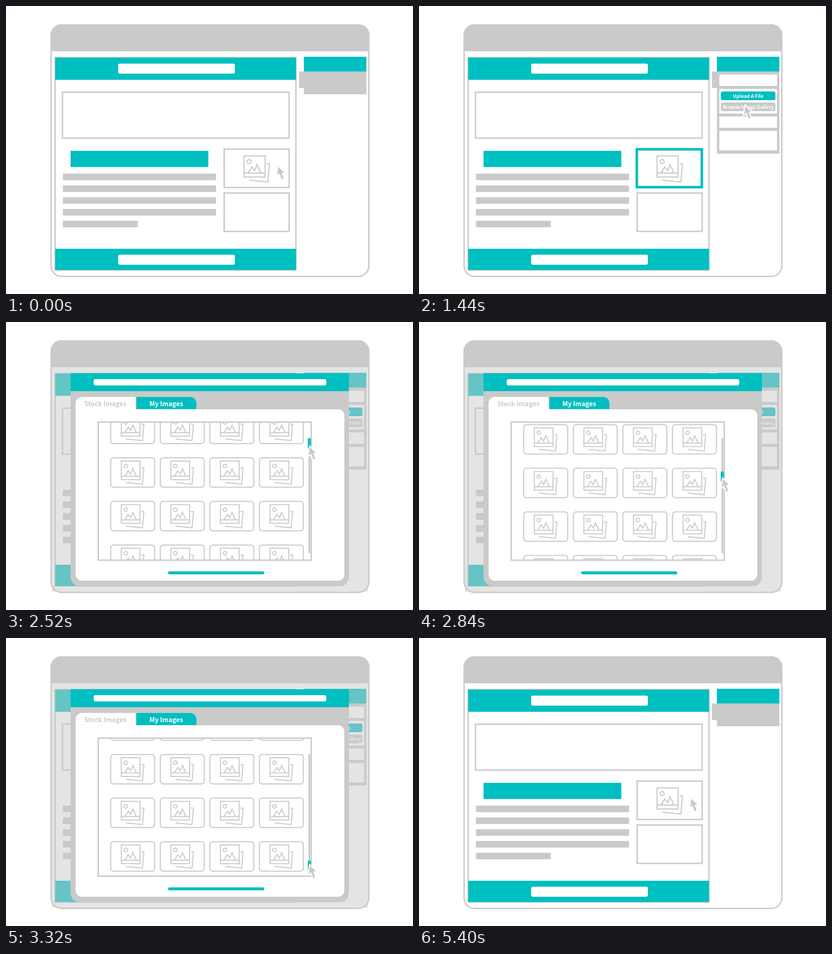
These frames come from a looping animation (889x630 px, 5.76 s). An HTML page:

```html
<!DOCTYPE html>
<html lang="en">
<head>
<meta charset="utf-8">
<title>Image gallery demo</title>
<style>
  html, body { margin: 0; width: 100%; height: 100%; overflow: hidden; background: #fff; }
  svg { display: block; width: 889px; height: 630px; }
  .teal { fill: #00bfc0; }
  .grey { fill: #cacaca; }
  .white { fill: #fff; }
  .line { fill: none; stroke: #cacaca; stroke-width: 3; }
  text { font-family: "Noto Sans CJK JP", "Noto Sans CJK SC", "Open Sans", sans-serif; font-weight: 700; text-anchor: middle; }
  .small { font-size: 10.4px; }
  .large { font-size: 14.2px; }

  .anim { animation: 5760ms cubic-bezier(.37, 0, .63, 1) infinite; }
  .select { animation-name: select; }
  .panel { animation-name: panel; }
  .fields { animation-name: fields; }
  .shade { animation-name: shade; }
  .modal { animation-name: grow; animation-timing-function: cubic-bezier(.5, 1, .89, 1); transform-origin: 779px 112px; }
  .fade { animation-name: fade; }
  .list { animation-name: list; }
  .rows { animation-name: rows; }
  .handle { animation-name: handle; }
  .pick { animation-name: pick; }
  .pick-fade { animation-name: pick-fade; }
  .cursor-x { animation-name: cursor-x; }
  .cursor-y { animation-name: cursor-y; }

  @keyframes select {
    0%, .694% { opacity: 0; }
    5.2%, 41.6% { opacity: 1; }
    41.61%, 100% { opacity: 0; }
  }
  @keyframes panel {
    0%, .3% { height: 50px; }
    10.417%, 83.6% { height: 180px; }
    93.75%, 100% { height: 50px; }
  }
  @keyframes fields {
    0%, .3% { opacity: 0; }
    7%, 86% { opacity: 1; }
    92%, 100% { opacity: 0; }
  }
  @keyframes shade {
    0%, 31.25% { opacity: 0; }
    34.72%, 73.4% { opacity: 1; }
    76.39%, 100% { opacity: 0; }
  }
  @keyframes grow {
    0%, 31.25% { transform: scale(0); }
    40.97%, 100% { transform: scale(1); }
  }
  @keyframes fade {
    0%, 73.4% { opacity: 1; }
    76.39%, 100% { opacity: 0; }
  }
  @keyframes list {
    0%, 37.5% { opacity: 0; }
    40.97%, 100% { opacity: 1; }
  }
  @keyframes rows {
    0%, 44.27% { transform: translateY(233px); }
    57.64%, 100% { transform: translateY(0); }
  }
  @keyframes handle {
    0%, 44.27% { transform: translateY(0); }
    57.64%, 100% { transform: translateY(233px); }
  }
  @keyframes pick {
    0%, 73.61% { transform: translate(553.5px, 349.5px) scale(.889); }
    76.39%, 77.08% { transform: translate(547.5px, 345px) scale(1); }
    82.64%, 100% { transform: translate(494px, 320px) scale(1); }
  }
  @keyframes pick-fade {
    0%, 73.6% { opacity: 0; }
    73.61%, 81.94% { opacity: 1; }
    83.33%, 100% { opacity: 0; }
  }
  @keyframes cursor-x {
    0%, 10.417% { transform: translateX(595px); }
    16.15% { transform: translateX(565px); }
    25%, 36.11% { transform: translateX(713px); }
    42.36%, 63% { transform: translateX(664px); }
    69.44% { transform: translateX(634px); }
    74.3%, 84.4% { transform: translateX(650px); }
    93.75%, 100% { transform: translateX(595px); }
  }
  @keyframes cursor-y {
    0%, 10.417% { transform: translateY(352px); }
    25%, 36.11% { transform: translateY(219px); }
    42.36%, 44.27% { transform: translateY(274px); }
    57.64%, 63% { transform: translateY(498px); }
    74.3%, 84.4% { transform: translateY(375px); }
    93.75%, 100% { transform: translateY(352px); }
  }
</style>
</head>
<body>
<svg viewBox="0 0 889 630">
  <defs>
    <g id="icon" class="line" style="stroke-width:2.5">
      <path d="M0 0H46V46H0ZM0 37.5H46M8.5 37.5L17 24L23 32L28.5 19L37 37.5M49.5 16.5L55.5 17L52 57L11.5 53"/>
      <circle cx="11" cy="12.3" r="4.4"/>
    </g>
    <g id="thumb">
      <rect class="line" width="108" height="72.5" rx="7" style="fill:#fff;stroke-width:2.6"/>
      <use href="#icon" x="26" y="8"/>
    </g>
    <clipPath id="panel-clip"><rect class="anim panel" x="651" y="143" width="136.5" height="50"/></clipPath>
    <clipPath id="list-clip"><rect x="201" y="219" width="466" height="302"/></clipPath>
  </defs>

  <!-- browser window and page -->
  <rect class="line" x="98.5" y="41.5" width="694" height="550" rx="23"/>
  <path class="grey" d="M97 99V64A24 24 0 0 1 121 40H770A24 24 0 0 1 794 64V99Z"/>
  <rect class="line" x="107.3" y="112.5" width="526" height="465"/>
  <rect class="teal" x="107.5" y="113" width="526" height="48.5"/>
  <rect class="teal" x="107.5" y="531" width="526" height="46.5"/>
  <rect class="white" x="245" y="126" width="255" height="22" rx="4"/>
  <rect class="white" x="245" y="544" width="255" height="22" rx="4"/>
  <rect class="line" x="123.3" y="188.5" width="495" height="100.5"/>
  <rect class="teal" x="141" y="316.8" width="301" height="35.4"/>
  <path class="grey" d="M124.3 366.7h334.5v14.4h-334.5zm0 25.8h334.5v14.4h-334.5zm0 25.8h334.5v14.4h-334.5zm0 25.8h334.5v14.4h-334.5zm0 25.6h163.3v14.4h-163.3z"/>
  <rect class="line" x="476.5" y="313" width="142" height="84"/>
  <rect class="line" x="476.5" y="409" width="142" height="84"/>
  <use href="#icon" x="520" y="328"/>
  <rect class="anim select" x="475.8" y="313.5" width="142" height="82.8" fill="none" stroke="#00bfc0" stroke-width="5.6"/>

  <!-- side panel -->
  <rect class="grey" x="640" y="143.3" width="11.5" height="36"/>
  <rect class="grey anim panel" x="650.7" y="143" width="136.5" height="50"/>
  <rect class="teal" x="650.7" y="111" width="136.5" height="32.3"/>
  <g clip-path="url(#panel-clip)">
    <g class="anim fields">
      <path class="white" d="M656 150h126v24.7h-126zm0 31.4h126v53.8h-126zm0 60.2h126v25h-126zm0 31.7h126v42.8h-126z"/>
      <rect class="teal" x="659.3" y="187" width="119.2" height="19" rx="4"/>
      <rect class="grey" x="659.3" y="211" width="119.2" height="19" rx="4"/>
      <text class="white small" x="719" y="200.5">Upload A File</text>
      <text class="white small" x="719.3" y="224.5">Browse Image Gallery</text>
    </g>
  </g>

  <g class="anim shade">
    <rect x="100" y="99" width="691" height="491" fill="#cacaca" fill-opacity=".5"/>
    <rect class="white" x="634" y="110.7" width="17" height="1.3"/>
  </g>

  <!-- gallery window -->
  <g class="anim fade">
    <g class="anim modal">
      <path class="grey" d="M141 112H749V558A20 20 0 0 1 729 578H161A20 20 0 0 1 141 558Z"/>
      <rect class="teal" x="141" y="112" width="608" height="39.3"/>
      <rect class="white" x="191.5" y="125" width="508" height="13.8" rx="4"/>
      <path class="white" d="M152 200V178A14 14 0 0 1 166 164H283.3V191H725A14 14 0 0 1 739 205V552A14 14 0 0 1 725 566H166A14 14 0 0 1 152 552Z"/>
      <path class="teal" d="M284.8 190.5V164H402A14 14 0 0 1 416 178V190.5Z"/>
      <text class="grey large" x="217" y="183.7">Stock Images</text>
      <text class="white large" x="350" y="183.7">My Images</text>
      <rect class="teal" x="354" y="545.5" width="210" height="6.6" rx="3.3"/>
      <g class="anim list">
        <g clip-path="url(#list-clip)"><g id="rows" class="anim rows"></g></g>
        <rect class="line" x="201.5" y="219" width="465.3" height="302"/>
        <rect class="grey" x="660.6" y="253.5" width="4" height="252.5" rx="2"/>
        <rect class="teal anim handle" x="659.2" y="254" width="6.6" height="23.5" rx="3"/>
      </g>
    </g>
  </g>

  <g class="anim pick-fade"><use href="#thumb" class="anim pick"/></g>

  <g class="anim cursor-x"><g class="anim cursor-y">
    <path class="grey" d="M0 0L-3 17.5L2.5 14.5L7 27.3L11.5 25.6L7 13L13 12.5Z" stroke="#fff" stroke-width="5" paint-order="stroke"/>
  </g></g>
</svg>
<script>
  const rows = document.getElementById('rows');
  for (let row = 0; row < 6; row++) {
    for (let col = 0; col < 4; col++) {
      const thumb = document.createElementNS('http://www.w3.org/2000/svg', 'use');
      thumb.setAttribute('href', '#thumb');
      thumb.setAttribute('transform', `translate(${228.7 + col * 108.3} ${445.6 - row * 95.4}) scale(.889)`);
      rows.append(thumb);
    }
  }
</script>
</body>
</html>
```
